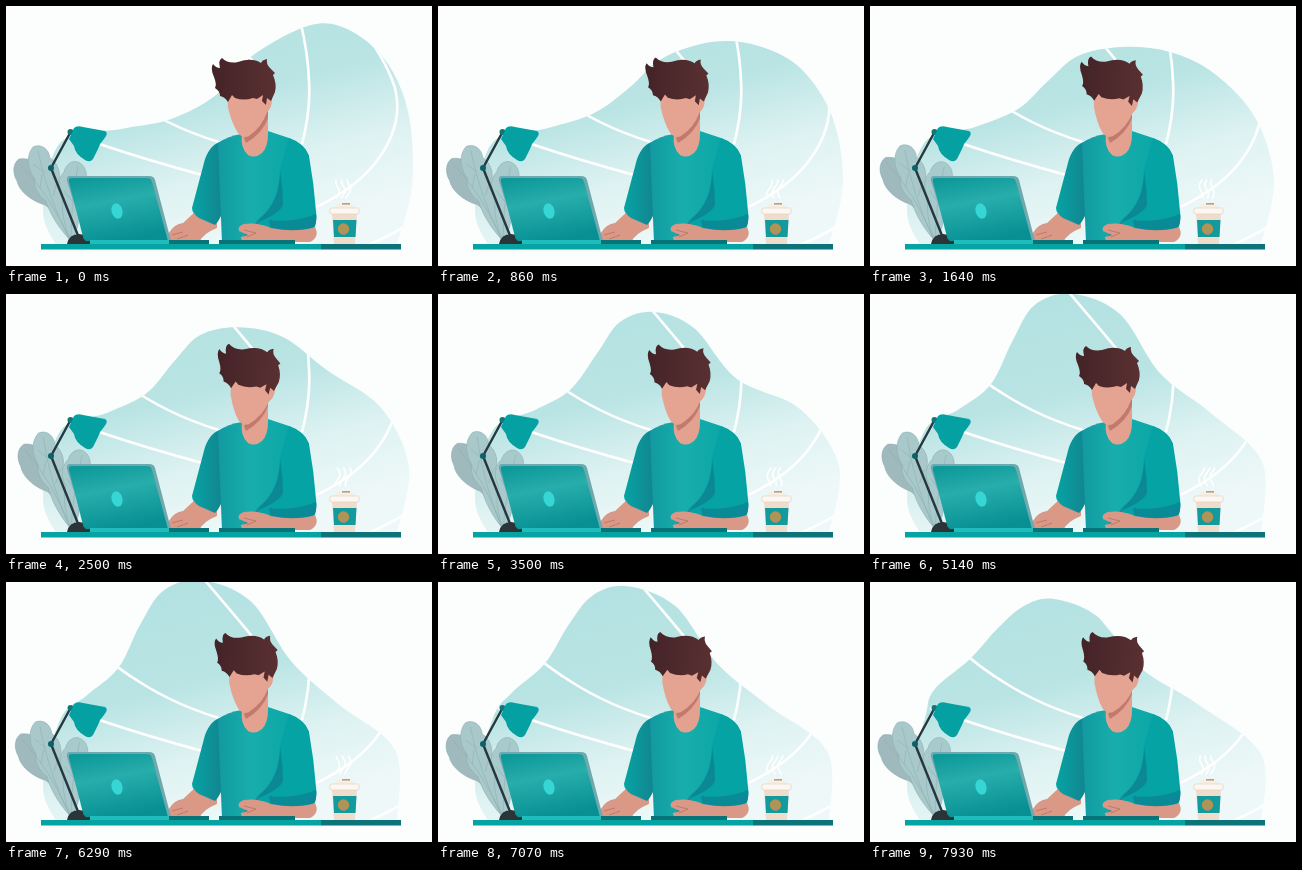
Animation, 426 px wide and 260 px high, one loop 8000 ms. Source, as an HTML page:

```html
<!DOCTYPE html>
<html lang="en">
<head>
<meta charset="utf-8">
<title>At the desk</title>
<style>
  html, body { margin: 0; width: 100%; height: 100%; overflow: hidden; background: #fcfefe; }
  svg { display: block; width: 100%; height: 100%; }
</style>
</head>
<body>
<svg viewBox="0 0 426 260">
  <defs>
    <linearGradient id="sky" gradientUnits="userSpaceOnUse" x1="165" y1="0" x2="228" y2="236">
      <stop offset="0" stop-color="#b3e1e1"/>
      <stop offset=".42" stop-color="#bae4e4"/>
      <stop offset=".72" stop-color="#def2f2"/>
      <stop offset="1" stop-color="#eef8f8"/>
    </linearGradient>
    <linearGradient id="lid" x1=".2" y1="0" x2=".5" y2="1">
      <stop offset="0" stop-color="#0d9899"/>
      <stop offset=".4" stop-color="#27adab"/>
      <stop offset="1" stop-color="#078f92"/>
    </linearGradient>
    <linearGradient id="shirt">
      <stop offset="0" stop-color="#119aa0"/>
      <stop offset=".35" stop-color="#18adac"/>
      <stop offset="1" stop-color="#04a5a4"/>
    </linearGradient>
    <linearGradient id="sleeve">
      <stop offset="0" stop-color="#06a3a3"/>
      <stop offset="1" stop-color="#13828d"/>
    </linearGradient>
    <linearGradient id="hair">
      <stop offset="0" stop-color="#432327"/>
      <stop offset="1" stop-color="#5a3032"/>
    </linearGradient>
    <clipPath id="blobClip"><path id="clipShape"/></clipPath>
  </defs>

  <path id="blob" fill="url(#sky)"/>
  <g clip-path="url(#blobClip)" fill="none" stroke="#fff" stroke-width="2.6">
    <path d="M190-12Q215 17 245 53L258 70"/>
    <path d="M293 10Q302 45 303 75Q305 105 295 142"/>
    <path d="M345 12Q377 45 389 82Q399 122 366 161Q344 186 304 204"/>
    <path d="M84 62Q108 85 140 104Q185 131 240 143"/>
    <path d="M60 126Q115 147 200 170"/>
    <path d="M360 240Q380 232 410 214"/>
  </g>

  <g id="leaves" stroke="#8fb0b4" stroke-width=".6">
    <path fill="#9fb9bd" d="M64 234C57 217 49 206 39 199C25 195 13 185 11 175C6 167 7 157 13 153C24 151 34 158 37 167C46 174 53 187 56 200C61 211 65 222 64 234Z"/>
    <path fill="#a9c8ca" d="M64 234C52 221 44 208 40 195C32 189 27 180 29 173C21 163 20 149 27 141C35 137 43 143 44 152C52 157 55 167 53 175C61 184 63 195 60 203C66 214 67 225 64 234Z"/>
    <path fill="#a8cacc" d="M65 234C58 220 55 204 57 192C51 183 52 172 58 166C60 157 68 153 74 157C82 162 82 174 77 181C81 191 78 202 72 207C74 217 70 228 65 234Z"/>
    <path fill="none" d="M64 234Q41 190 32 145M64 234Q45 190 14 158M65 234Q65 195 72 160M47 190L51 176M38 166L27 158M34 182L36 168M66 195L58 185M67 186L76 177"/>
  </g>

  <g id="lamp" stroke-linecap="round">
    <path d="M64 127L45 162L73 232" fill="none" stroke="#26383f" stroke-width="2.4"/>
    <circle cx="45" cy="162" r="3" fill="#0a6268"/>
    <circle cx="64.5" cy="126" r="3" fill="#14747a"/>
    <path d="M63 133L68 122Q71 119 77 121L99 125Q103 127 98 133Q94 137 92 143L87 153Q84 157 79 154Q69 148 68 140Z" fill="#05a1a2"/>
    <path d="M61 238Q63 228 73 228Q83 228 85 238Z" fill="#2b3439"/>
  </g>

  <g id="torso">
    <path d="M190 205L211 210V222Q198 227 193 236H166Q160 235 163 227Q168 218 177 217Z" fill="#d99986"/>
    <path d="M166 229L177 226M171 233L182 229" stroke="#bd7b6b" fill="none"/>
    <path d="M217 135Q205 137 199 153L186 202Q186 207 193 212L209 219Q215 213 219 199Z" fill="url(#sleeve)"/>
    <path d="M236 128Q222 130 212 137L216 237H286L304 221L303 150Q299 138 283 132L262 125Z" fill="url(#shirt)"/>
    <path d="M274 163Q274 196 254 212L232 237H283L280 203Z" fill="#0a8893"/>
    <path d="M283 132Q298 137 303 150Q308 178 310 205Q312 217 306 221L263 222L250 217Q270 210 277 200Q277 184 274 163Z" fill="#05a3a3"/>
    <path d="M263 214Q288 217 310 208Q311 218 308 222Q285 230 265 224Z" fill="#0a8a96"/>
    <path d="M238 218Q252 216 265 222Q290 227 309 221Q314 231 304 236H242Q234 236 235 231L242 229L233 225Q231 220 238 218Z" fill="#d99986"/>
    <path d="M238 224L250 227L241 231" fill="none" stroke="#bd7b6b"/>
    <path d="M239 122L262 103V128Q262 141 256 147Q249 153 242 149Q234 142 236 128Z" fill="#e3a290"/>
    <path d="M238 132L262 104V112Q257 127 240 137Z" fill="#c17a6d"/>
  </g>

  <g id="head">
    <path d="M221 80L222 102Q226 118 232 127Q237 133 243 130Q256 121 261 106Q266 102 266 93L261 78Z" fill="#e5a491"/>
    <path d="M222 96Q219 91 214 90Q214 85 209 82Q211 79 208 71Q204 62 207 58Q210 62 214 62Q212 54 216 52Q222 58 232 56Q246 51 255 57Q256 54 261 53Q260 58 264 62L269 67L267 69Q271 78 269 86L265 95L261 92L260 99L256 95L257 89L251 93L247 92Q238 95 229 92L226 89Z" fill="url(#hair)"/>
  </g>

  <g id="laptop">
    <path d="M64 170H143Q148 170 149 174L165 235H80L61 175Q60 170 64 170Z" fill="#6fa9ad"/>
    <path d="M66 172H141Q145 172 146 176L162 235H82Q78 235 77 231L63 176Q62 172 66 172Z" fill="url(#lid)"/>
    <ellipse cx="111" cy="205" rx="5.5" ry="7.8" transform="rotate(-14 111 205)" fill="#35d6d3"/>
    <path d="M84 234H163V238H84Z" fill="#20bcbc"/>
    <path d="M163 234H203V238H163ZM213 234H289V238H213Z" fill="#087479"/>
  </g>

  <g id="cup">
    <path d="M326 207H351L349 238H328Z" fill="#efdccb"/>
    <path d="M327 214H350.5L349.5 231H328Z" fill="#139a9c"/>
    <path d="M328 203L330 198H347L349 203Z" fill="#f6efe8"/>
    <rect x="336" y="197" width="8" height="1.6" fill="#c79a70"/>
    <rect x="324" y="202" width="29" height="6" rx="1.5" fill="#fbf8f4" stroke="#e3cfbd" stroke-width=".7"/>
    <circle cx="337.5" cy="223" r="5.7" fill="#b39257"/>
  </g>
  <path id="steam" fill="none" stroke="#fff" stroke-width="1.6" stroke-linecap="round"/>
  <path d="M35 238H315V243.5H35Z" fill="#06a3a3"/>
  <path d="M315 238H395V243.5H315Z" fill="#0a747a"/>
</svg>

<script>
const LOOP = 8000;
// Key poses of the backdrop's upper edge, left to right
const poses = [
  { time: 0, edge: '115,123 165,113 210,89 246,50 305,19 345,25 382,58 403,110 406,180' },
  { time: 1640, edge: '105,121 148,103 178,75 208,50 252,41 300,46 345,68 386,113 404,175' },
  { time: 3500, edge: '97,116 132,96 160,58 182,28 216,18 256,34 299,85 362,115 401,172' },
  { time: 5800, edge: '84,115 116,88 137,44 160,8 198,-3 248,18 288,78 335,121 390,168' },
  { time: 7930, edge: '64,108 100,77 128,46 154,24 184,17 228,35 272,87 326,121 391,172' }
].map(({ time, edge }) => ({ time, edge: edge.split(' ').map(p => p.split(',').map(Number)) }));

const byId = id => document.getElementById(id);
const clamp = (v, max) => Math.max(0, Math.min(max, v));
const wave = (t, period) => (1 - Math.cos(2 * Math.PI * t / period)) / 2;

// Smooth motion through the poses for one coordinate
function coordinateAt(t, point, axis) {
  const last = poses.length - 1;
  const value = k => poses[k].edge[point][axis];
  const gap = k => poses[k + 1].time - poses[k].time;
  const slope = k => (value(k + 1) - value(k)) / gap(k);
  const inner = k => (slope(k - 1) + slope(k)) / 2;
  const tangent = k => k === 0 ? 2 * slope(0) - inner(1)
    : k === last ? 2 * slope(last - 1) - inner(last - 1) : inner(k);
  let i = 0;
  while (i < last - 1 && t > poses[i + 1].time) i++;
  const s = (t - poses[i].time) / gap(i), r = 1 - s;
  return value(i) * (1 + 2 * s) * r * r + tangent(i) * gap(i) * s * r * r
    + value(i + 1) * s * s * (3 - 2 * s) - tangent(i + 1) * gap(i) * s * s * r;
}

function spline(points) {
  const at = i => points[clamp(i, points.length - 1)];
  const control = (k, sign) =>
    [0, 1].map(axis => at(k)[axis] + sign * (at(k + 1)[axis] - at(k - 1)[axis]) / 6);
  return `M${points[0]}` + points.slice(1).map((p, i) => `C${control(i, 1)} ${control(i + 1, -1)} ${p}`).join('');
}

function blobPath(t) {
  const edge = poses[0].edge.map((_, i) => [coordinateAt(t, i, 0), coordinateAt(t, i, 1)]);
  return spline([[50, 239], [37, 203], [55, 136], ...edge, [391, 239]]) + 'Z';
}

function steamPath(t) {
  return [331, 336.5, 342].map((x, n) => {
    const points = [];
    for (let y = 192; y >= 173; y -= 2) {
      points.push([x + 2.3 * Math.sin(y / 3.6 + t / 320 + n * .4) + (186 - y) * .1, y]);
    }
    return spline(points);
  }).join('');
}

function draw(now) {
  const t = now % LOOP;
  const outline = blobPath(t);
  byId('blob').setAttribute('d', outline);
  byId('clipShape').setAttribute('d', outline);
  byId('steam').setAttribute('d', steamPath(t));
  byId('leaves').setAttribute('transform', `rotate(${4.5 * wave(t, 7600)} 64 236)`);
  byId('head').setAttribute('transform', `rotate(${5 * wave(t, 5050)} 244 130)`);
  requestAnimationFrame(draw);
}
requestAnimationFrame(draw);
</script>
</body>
</html>
```
